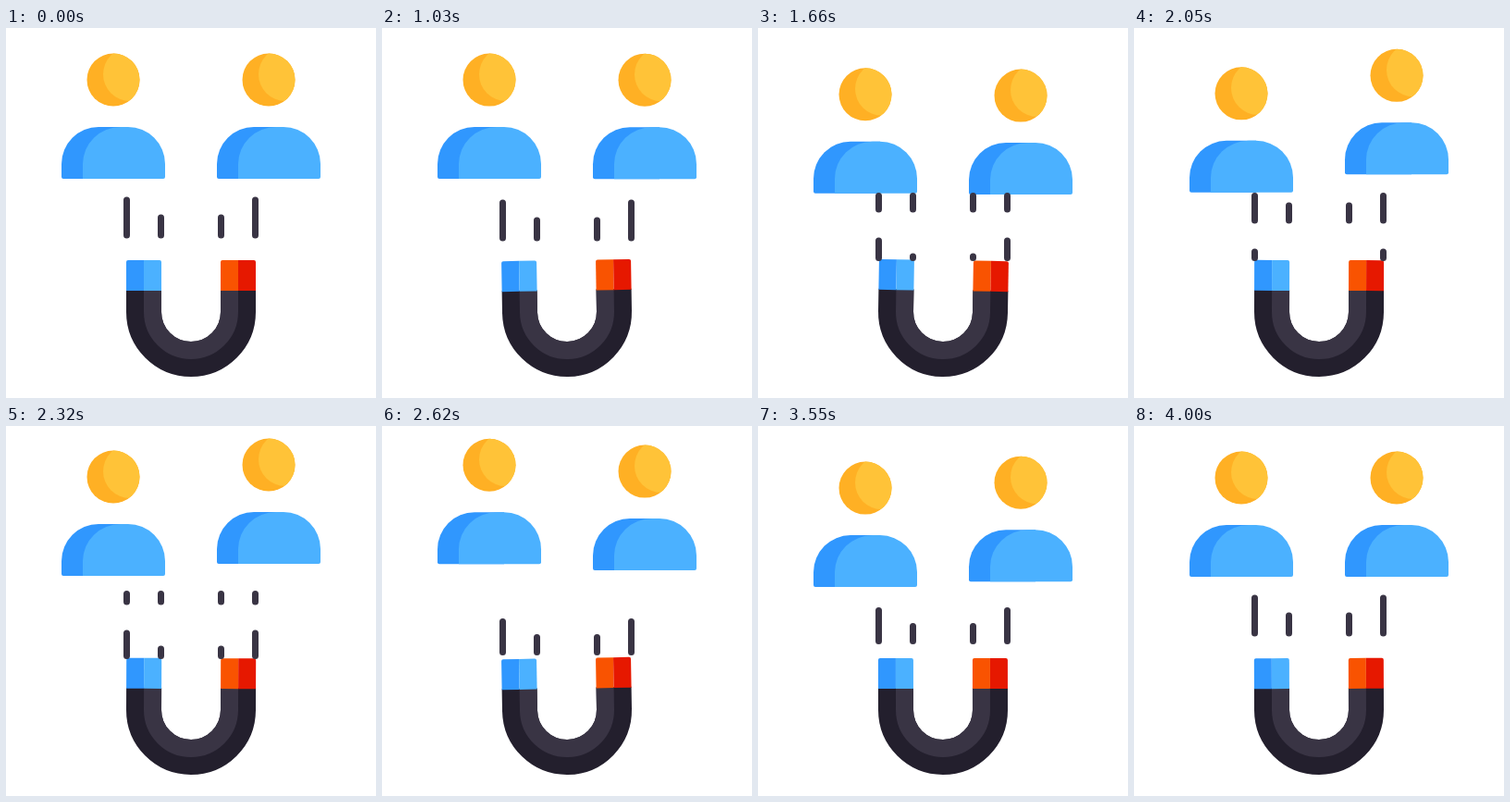
An HTML page for the animation above (4030 ms loop, 400x400 px).

```html
<!DOCTYPE html>
<html>
<head>
<meta charset="utf-8">
<style>
  html, body { margin: 0; width: 100%; height: 100%; overflow: hidden; background: #fff; }
  svg { display: block; width: 100vw; height: 100vh; }
</style>
</head>
<body>
<svg viewBox="0 0 400 400">
  <defs>
    <clipPath id="face"><circle cx="116" cy="56" r="28.5"/></clipPath>
    <g id="person">
      <circle cx="116" cy="56" r="28.5" fill="#ffb024"/>
      <circle cx="134" cy="50" r="29" fill="#ffc338" clip-path="url(#face)"/>
      <path fill="#3097fe" d="M60 161v-14a40 40 0 0 1 40-40h32v56h-70q-2 0-2-2z"/>
      <path fill="#4bb1ff" d="M83 163v-16a41 40 0 0 1 41-40h8a40 40 0 0 1 40 40v14q0 2-2 2z"/>
    </g>
  </defs>
  <use id="left" href="#person"/>
  <use id="right" href="#person"/>
  <g id="magnet">
    <g fill="none">
      <path stroke="#231f2d" stroke-width="38" d="M149 283v24a51 51 0 0 0 102 0v-24"/>
      <path stroke="#393444" stroke-width="19" d="M158.5 283v24a41.5 41.5 0 0 0 83 0v-24"/>
    </g>
    <path fill="#3097fe" d="M149 251h-17q-2 0-2 2v31h19z"/>
    <path fill="#4bb1ff" d="M149 251h17q2 0 2 2v31h-19z"/>
    <path fill="#f95301" d="M251 251h-17q-2 0-2 2v31h19z"/>
    <path fill="#e61800" d="M251 251h17q2 0 2 2v31h-19z"/>
  </g>
  <path id="lines" fill="none" stroke="#393444" stroke-width="7" stroke-linecap="round"/>
</svg>
<script>
const LOOP = 4030, HOLD = 1000, SPAN = 3000, STEP = 30;
const TOP = 181.5, TRACK = 67;
const el = id => document.getElementById(id);
const linear = p => p;
const smooth = p => (1 - Math.cos(Math.PI * p)) / 2;

// Keys are [ms, value] pairs.
function follow(keys, t, ease) {
  const i = Math.max(1, keys.findIndex(k => k[0] >= t));
  const [t0, a] = keys[i - 1], [t1, b] = keys[i];
  return a + (b - a) * ease((t - t0) / (t1 - t0));
}

const leftKeys = [[0, 0], [880, 18.5], [1660, -14], [2455, 12], [SPAN, 0]];
const rightKeys = [[0, 0], [535, 19], [1335, -14], [2135, 11], [2935, 0], [SPAN, 0]];
const flowKeys = [[0, 0], [30, 3], [660, 106], [1050, 185], [1620, 288.5], [2130, 356], [SPAN, 7 * TRACK]];
const shrinkKeys = [[0, 0], [400, 1], [2600, 1], [SPAN, 0]];

// A dash that wraps from the bottom of its track to the top.
function dash(x, head, length) {
  const tail = head - length;
  const piece = (a, b) => `M${x} ${TOP + a}V${TOP + b}`;
  return tail < 0 ? piece(0, head) + piece(TRACK + tail, TRACK) : piece(tail, head);
}

function wobble(t) {
  const n = t / STEP;
  const drift = 0.2 * Math.sin(Math.PI * Math.max(0, n - 22) / 49);
  return -1.1 * Math.sin(2 * Math.PI * (n / 6 + drift));
}

function draw(t) {
  el('left').setAttribute('transform', `translate(0 ${follow(leftKeys, t, smooth)})`);
  el('right').setAttribute('transform', `translate(168 ${follow(rightKeys, t, smooth)})`);
  el('magnet').setAttribute('transform', `rotate(${wobble(t)} 200 307)`);
  const head = (42.5 + follow(flowKeys, t, linear)) % TRACK;
  const shrink = follow(shrinkKeys, t, smooth);
  const long = 38 - 5 * shrink, short = 19 - 3 * shrink;
  el('lines').setAttribute('d',
    dash(130.5, head, long) + dash(167.5, head, short) +
    dash(232.5, head, short) + dash(269.5, head, long));
}

const start = performance.now();
function tick() {
  const time = (performance.now() - start) % LOOP;
  const t = Math.floor((time - HOLD) / STEP) * STEP;
  draw(Math.min(SPAN, Math.max(0, t)));
  requestAnimationFrame(tick);
}
tick();
</script>
</body>
</html>
```
